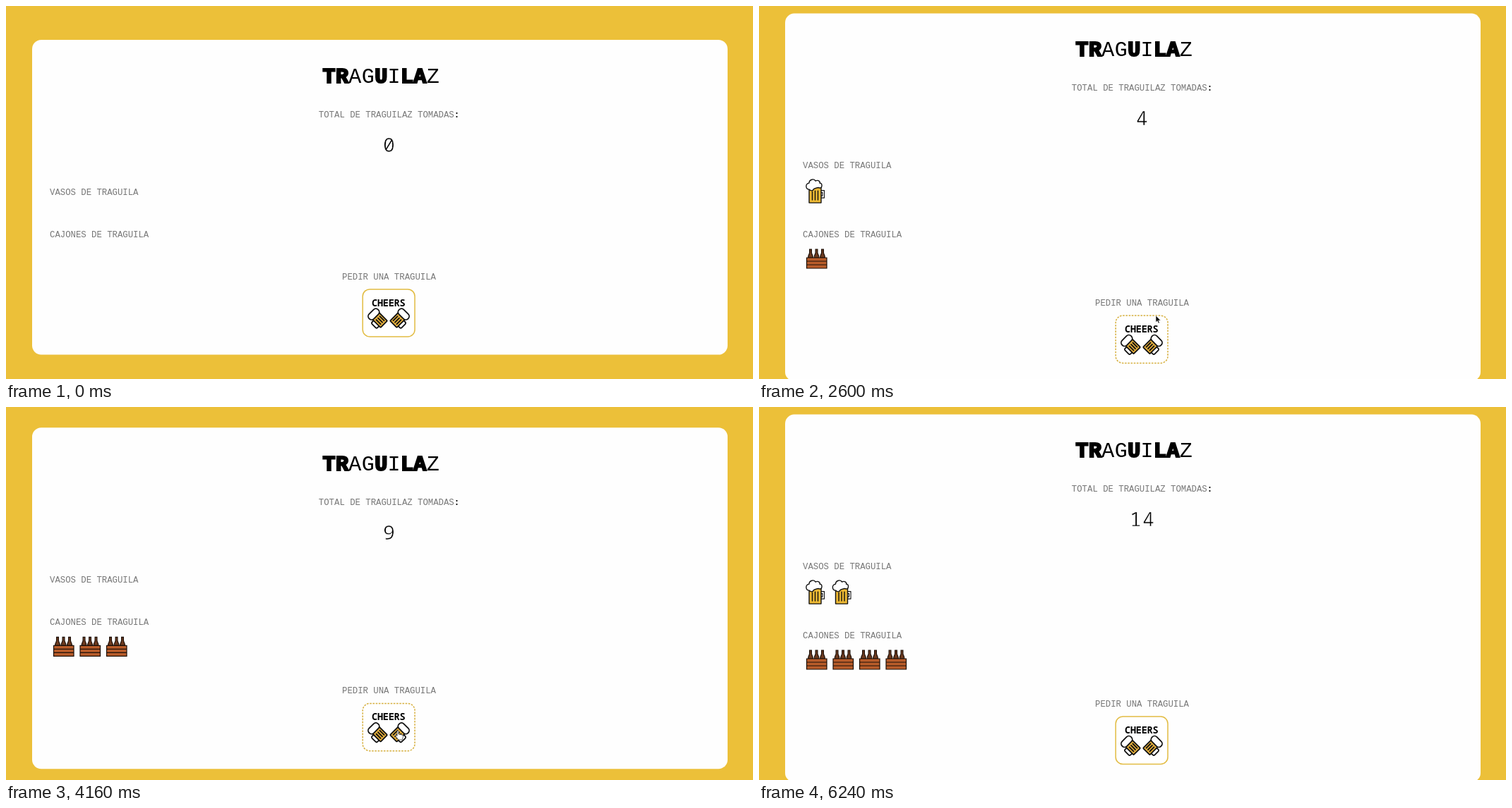
Animation, 1058 px wide and 529 px high, one loop 6.5 s. Source, as an HTML page:

```html
<!DOCTYPE html>
<html lang="es">
<head>
<meta charset="utf-8">
<title>Traguilaz</title>
<style>
  html, body { margin: 0; width: 100%; height: 100%; overflow: hidden; background: #ecc039; }
  svg { display: block; width: 1058px; height: 529px; }
  text { font-family: "Liberation Mono", monospace; fill: #000; white-space: pre; }
  .label { font-size: 12.3px; fill: #777; }
  .mid { text-anchor: middle; }
  .title { font-size: 30px; letter-spacing: .4px; }
  .fat { font-weight: 700; stroke: #000; stroke-width: 2.2px; }
  .colon { font-weight: 700; fill: #000; }
  .count { font: 28px "Noto Sans Mono", monospace; letter-spacing: 1.6px; stroke: #fefefe; stroke-width: .6px; }
  .cheers { font: 700 13.5px "Noto Sans Mono", monospace; letter-spacing: -.2px; }
  #frame { fill: #fff; stroke: #e2bc43; stroke-width: 1.5px; }
  #frame.hover { stroke: #d6b040; stroke-dasharray: 2.6 1.6; }
</style>
</head>
<body>
<svg viewBox="0 0 1058 529">
  <defs>
    <g id="glass" stroke="#111" stroke-width="1.4" stroke-linejoin="round" stroke-linecap="round">
      <path d="M22 16.5h4.500v10.500h-4.500M22 19.500h2v4.500h-2" fill="none" stroke-width="1.1"/>
      <path d="M5 12V34H22V12z" fill="#ecb833"/>
      <path d="M9.500 18V30M13.500 17V30M17.500 17V30" fill="none"/>
      <path d="M5 15C0 15-1 7 5 6 5 1 12-1 14 3 18 1 21 4 20 6 24 6 24 13 20 13 17 11 15 14 12 14 10 18 7 17 5 15z" fill="#fff"/>
    </g>
    <path id="bottle" d="M-1.4.5h2.8v4.500c0 3 2 3 2 7.500h-6.8c0-4.500 2-4.500 2-7.500z" fill="#6d3b20"/>
    <g id="crate" stroke="#1d1009" stroke-width="1.2">
      <use href="#bottle" x="6"/><use href="#bottle" x="14.500"/><use href="#bottle" x="23"/>
      <path d="M.5 12.500h28.500v15H.5z" fill="#b85c2a"/>
      <path d="M.5 17.500h28.500M.5 22.500h28.500"/>
    </g>
    <g id="mug" transform="translate(-15 0) rotate(-45)" stroke="#111" stroke-width="1.8" stroke-linejoin="round" stroke-linecap="round">
      <rect x="-11" y="-3" width="7" height="11" rx="2" fill="#fff"/>
      <rect x="-6" y="-8" width="13.500" height="19" rx="1" fill="#e3ae3c"/>
      <path d="M-2.500-1V7.500M1-1V7.500M4.500-1V7.500"/>
      <rect x="-8.500" y="-14" width="18" height="9.500" rx="4.500" fill="#fff"/>
    </g>
  </defs>

  <rect id="card" x="37" width="985" rx="13" fill="#fefefe"/>
  <g id="content">
    <text class="title" x="448.500" y="60.500"><tspan class="fat">TR</tspan>AG<tspan class="fat">U</tspan>I<tspan class="fat">LA</tspan>Z</text>
    <text class="label mid" x="542.500" y="109.500">TOTAL DE TRAGUILAZ TOMADAS<tspan class="colon">:</tspan></text>
    <text id="count" class="count mid" x="543.300" y="158.500"></text>
    <text class="label" x="62" y="219.500">VASOS DE TRAGUILA</text>
    <g id="glasses" transform="translate(66 234.500)"></g>
    <g id="crateRow">
      <text class="label" x="62" y="279.500">CAJONES DE TRAGUILA</text>
      <g id="crates" transform="translate(67 296.500)"></g>
    </g>
    <g id="order">
      <text class="label mid" x="542.500" y="339.500">PEDIR UNA TRAGUILA</text>
      <rect id="frame" x="505.200" y="353.700" width="73.800" height="67.300" rx="10"/>
      <text class="cheers mid" x="541.700" y="377.500">CHEERS</text>
      <g transform="translate(542 396)">
        <use href="#mug"/><use href="#mug" transform="scale(-1 1)"/>
      </g>
    </g>
  </g>
  <g id="cursor" stroke-width=".9" stroke-linejoin="round">
    <path id="hand" d="M3 1C3-.3 5-.3 5 1v4l5 1c1.500.4 1.500 1 1.300 3L10 13H5L1 8C0 6.500 1.500 6 3 7.500z" fill="#fff" stroke="#555"/>
    <path id="arrow" d="M0 0v9.500l2.200-2L3.700 11l1.600-.7-1.500-3.300h3z" fill="#111" stroke="#fff" stroke-width=".5"/>
  </g>
</svg>
<script>
const LOOP = 6500, ROW = 37.4, PITCH = 37.5;
// Each entry is the moment of one more drink.
const clicks = [1300, 1690, 2080, 2600, 2860, 3120, 3510, 3900, 4160, 4420, 4810, 5590, 5850, 5980];
// Cursor poses: start time, shape, x, y.
const poses = [
  [0, ''], [780, 'hand', 559, 430], [1300, 'hand', 559, 432],
  [2600, 'arrow', 562, 439], [2730, 'hand', 556, 450], [2860, 'hand', 551, 459],
  [6110, '']
];

const $ = id => document.getElementById(id);
const show = (node, on) => node.style.display = on ? '' : 'none';
const move = (node, x, y) => node.setAttribute('transform', `translate(${x} ${y})`);

function fill(id, icon, total) {
  $(id).innerHTML = Array.from({ length: total }, (_, i) =>
    `<use href="#${icon}" x="${i * PITCH}"/>`).join('');
}
fill('glasses', 'glass', 2);
fill('crates', 'crate', 4);

function render(t) {
  const drinks = clicks.filter(c => c <= t).length;
  const glasses = drinks % 3, crates = Math.floor(drinks / 3);
  const glassRow = glasses ? ROW : 0;
  const extra = glassRow + (crates ? ROW : 0);
  const top = 48 - extra / 2;

  $('card').setAttribute('y', top);
  $('card').setAttribute('height', 446.5 + extra);
  move($('content'), 0, top);
  move($('crateRow'), 0, glassRow);
  move($('order'), 0, extra);
  $('count').textContent = drinks;
  [...$('glasses').children].forEach((g, i) => show(g, i < glasses));
  [...$('crates').children].forEach((c, i) => show(c, i < crates));

  const [, shape, x = 0, y = 0] = poses.filter(p => p[0] <= t).pop();
  move($('cursor'), x, y);
  show($('hand'), shape === 'hand');
  show($('arrow'), shape === 'arrow');
  $('frame').classList.toggle('hover', shape !== '');
}

const start = performance.now();
(function tick() {
  render((performance.now() - start) % LOOP);
  requestAnimationFrame(tick);
})();
</script>
</body>
</html>
```
